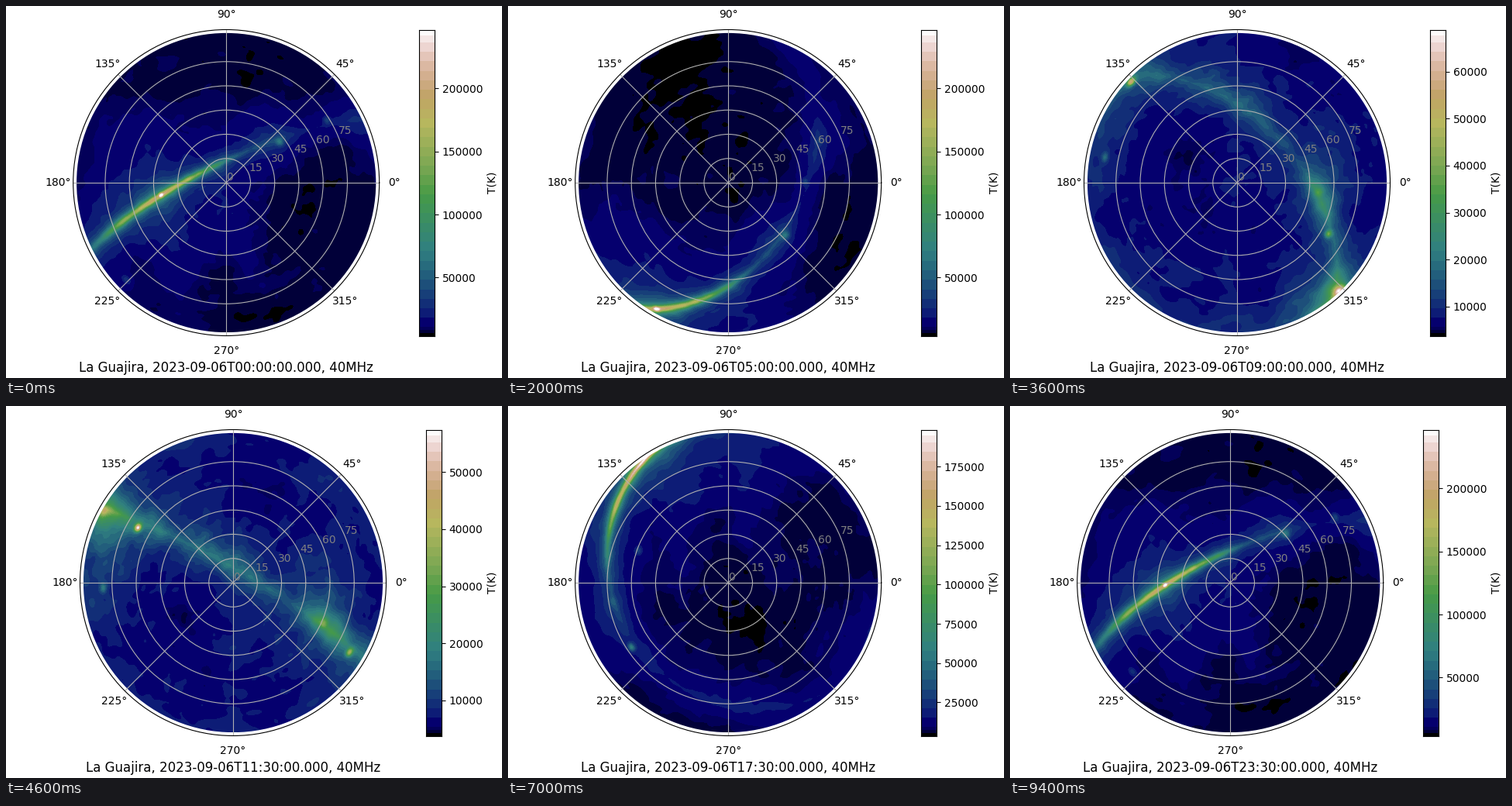
Write a matplotlib script that moves like this. It is 640 px wide and 480 px high and loops after 9.6 s.

```python
import numpy as np
import matplotlib.pyplot as plt
from matplotlib.animation import FuncAnimation
from matplotlib.patches import Circle

W, H, DPI = 640, 480, 100
FRAMES, INTERVAL = 48, 200
LAT = np.radians(11.5)
LST_START = 18.32           # local sidereal time at 00:00 UT, hours
R_AXIS, R_SKY = 94.8, 92.7  # zenith angles of the frame and of the map edge
LEFT, TOP, SIZE = 86.7, 30.5, 395  # plot square in pixels
BAR_LEFT, BAR_WIDTH = 533.2, 19.8
DIGIT = 8.8                 # width of one tick label digit
STEP = 0.5                  # sky map resolution, degrees
T_LOW, T_PEAK = 3800, 246700


def sphere(lon, lat):
    lon, lat = np.radians(lon), np.radians(lat)
    return np.stack([np.cos(lat) * np.cos(lon), np.cos(lat) * np.sin(lon),
                     np.sin(lat)], axis=-1)


def equator_to_galaxy():
    """Rows are the galactic axes: centre, 90 degrees of longitude, pole."""
    centre = sphere(266.405, -28.936)
    pole = sphere(192.859, 27.128)
    return np.array([centre, np.cross(pole, centre), pole])


EQ_TO_GAL = equator_to_galaxy()


def wrap(angle):
    return (angle + 180) % 360 - 180


def bump(x, width):
    return np.exp(-(x / width) ** 2)


def distance(vec, lon, lat):
    return np.degrees(np.arccos(np.clip(vec @ sphere(lon, lat), -1, 1)))


def texture(vec, rng, waves=110):
    """Isotropic random field on the sphere with unit spread."""
    vec = vec.astype(np.float32)
    field = np.zeros(vec.shape[:2], dtype=np.float32)
    for k in np.geomspace(4, 85, waves):
        d = rng.normal(size=3)
        d *= k / np.linalg.norm(d)
        phase = rng.uniform(0, 2 * np.pi)
        field += k ** -0.5 * np.cos(vec @ d.astype(np.float32) + phase)
    return field / field.std()


def build_sky():
    """Radio brightness (K) on a galactic longitude/latitude grid."""
    rng = np.random.default_rng(40)
    lon, lat = np.meshgrid(np.arange(0, 360 + STEP, STEP),
                           np.arange(-90, 90 + STEP, STEP))
    vec = sphere(lon, lat)
    grain = texture(vec, rng)
    height = np.abs(lat)

    # thin bright disc towards the centre, wide and faint outside
    ridge = 5 + 140 / (1 + (np.abs(wrap(lon + 3)) / 43) ** 5)
    ridge += 12 * bump(wrap(lon - 78), 15) + 7 * bump(wrap(lon - 122), 28)
    ridge += 10 * bump(wrap(lon - 284), 14)
    inner = np.exp(-(wrap(lon) / 60) ** 4)
    thin, mid = 0.1 + 0.48 * inner, 0.35 - 0.1 * inner
    disc = ridge * (thin * np.exp(-0.5 * (lat / 1.1) ** 2)
                    + mid * np.exp(-0.5 * (lat / (4.8 - 2.3 * inner)) ** 2)
                    + (1 - thin - mid) * np.exp(-height / 7.5))

    halo = 7.1 + 3 * np.exp(-height / 16) + 8 * bump(distance(vec, 0, 0), 52)
    halo += 9 * bump(wrap(lon), 35) * bump(lat, 13)
    spur = bump(distance(vec, 329, 17.5) - 56, 7)
    halo += 4 * spur * bump(wrap(lon - 30), 45) * (lat > 8)
    for side in (-1, 1):
        halo -= 2.1 * bump(distance(vec, 225, side * 47), 23)

    sky = halo * np.exp(0.12 * grain) + disc * np.exp(0.1 * grain)
    # compact sources: longitude, latitude, kilokelvin, width
    for l0, b0, amp, width in (
            (0, 0, 120, 1.3), (80, 1.8, 38, 2.4), (111.7, -2.1, 24, 1.9),
            (135, 1, 11, 2.8), (263.9, -3, 42, 1.9), (287, -1, 12, 2),
            (279.5, -33, 9, 2), (309.3, 19, 18, 2.2)):
        sky += amp * bump(distance(vec, l0, b0), width)
    return np.minimum(sky * 1000, T_PEAK)


def horizon_vectors(n):
    """North, east and up components for every pixel of the map."""
    axis = (np.arange(n) + 0.5) / n * 2 * R_SKY - R_SKY
    x, y = np.meshgrid(axis, axis)
    r = np.hypot(x, y)
    az = np.degrees(np.arctan2(y, x))
    return sphere(az, 90 - r), r <= R_SKY


def horizon_to_galaxy(lst):
    s, c = np.sin(LAT), np.cos(LAT)
    to_hour_angle = np.array([[-s, 0, c], [0, -1, 0], [c, 0, s]])
    a = np.radians(lst * 15)
    to_equator = np.array([[np.cos(a), np.sin(a), 0],
                           [np.sin(a), -np.cos(a), 0], [0, 0, 1]])
    return EQ_TO_GAL @ to_equator @ to_hour_angle


def sample(sky, vec):
    """Bilinear lookup of the sky map along unit vectors."""
    u = np.degrees(np.arctan2(vec[..., 1], vec[..., 0])) % 360 / STEP
    v = (np.degrees(np.arcsin(np.clip(vec[..., 2], -1, 1))) + 90) / STEP
    i = np.minimum(u.astype(int), sky.shape[1] - 2)
    j = np.minimum(v.astype(int), sky.shape[0] - 2)
    u, v = u - i, v - j
    low = sky[j, i] * (1 - u) + sky[j, i + 1] * u
    high = sky[j + 1, i] * (1 - u) + sky[j + 1, i + 1] * u
    return low * (1 - v) + high * v


# Colour bands: fine steps in the dark end, even steps above
EDGES = np.r_[0:0.025:0.01, 0.03, np.linspace(0.06, 0.96, 30), 0.982]
TONES = (EDGES + np.r_[EDGES[1:], 1]) / 2
TONES[:4] = EDGES[:4] * 1.02
TONES[-1] = 1
COLORS = (plt.get_cmap("gist_earth")(TONES) * 255).round().astype(np.uint8)


def colorize(frac):
    band = np.searchsorted(EDGES, frac, side="right") - 1
    return COLORS[np.clip(band, 0, len(COLORS) - 1)]


def box(left, width):
    return [left / W, 1 - (TOP + SIZE) / H, width / W, SIZE / H]


N = 387
SKY = build_sky()
PIXELS, VISIBLE = horizon_vectors(N)

fig = plt.figure(figsize=(W / DPI, H / DPI), dpi=DPI, facecolor="white")

sky_ax = fig.add_axes(box(LEFT, SIZE))
sky_ax.set_axis_off()
sky_img = sky_ax.imshow(np.zeros((N, N, 4), np.uint8), origin="lower",
                        extent=(-R_SKY, R_SKY, -R_SKY, R_SKY),
                        interpolation="nearest", aspect="auto")
sky_ax.set(xlim=(-R_AXIS, R_AXIS), ylim=(-R_AXIS, R_AXIS))
sky_img.set_clip_path(Circle((0, 0), R_SKY, transform=sky_ax.transData))

grid_ax = fig.add_axes(box(LEFT, SIZE), projection="polar")
grid_ax.patch.set_visible(False)
grid_ax.set_ylim(0, R_AXIS)
grid_ax.set_yticks(range(0, 90, 15))
grid_ax.tick_params(axis="y", labelcolor="gray")

bar_ax = fig.add_axes(box(BAR_LEFT, BAR_WIDTH))
bar_rows = (np.arange(SIZE) + 0.5) / SIZE
bar_img = bar_ax.imshow(colorize(bar_rows)[:, None], origin="lower",
                        extent=(0, 1, 0, 1), aspect="auto",
                        interpolation="nearest")
bar_ax.set_xticks([])
bar_ax.yaxis.tick_right()
bar_ax.yaxis.set_label_position("right")
bar_ax.yaxis.set_major_formatter("{x:.0f}")
bar_ax.set_ylabel("T(K)")

caption = fig.text(0, 1 - 472 / H, "", fontsize=12, ha="center",
                   va="baseline")


def update(i):
    turn = horizon_to_galaxy(LST_START + i / 2 * 1.002738)
    temp = sample(SKY, PIXELS @ turn.T)
    high = temp[VISIBLE].max()
    sky_img.set_data(colorize((temp - T_LOW) / (high - T_LOW)))

    bar_img.set_extent((0, 1, T_LOW, high))
    bar_ax.set_ylim(T_LOW, high)

    # shorter tick labels leave room to move right
    shift = 0 if high >= 1e5 else DIGIT
    for ax in (sky_ax, grid_ax):
        ax.set_position(box(LEFT + shift, SIZE))
    bar_ax.set_position(box(BAR_LEFT + shift, BAR_WIDTH))
    caption.set_x((LEFT + SIZE / 2 + shift) / W)
    caption.set_text(f"La Guajira, 2023-09-06T{i // 2:02d}:{i % 2 * 30:02d}"
                     ":00.000, 40MHz")
    return sky_img, bar_img, caption


anim = FuncAnimation(fig, update, frames=FRAMES, interval=INTERVAL,
                     repeat=True, repeat_delay=0, blit=False)
plt.show()
```
